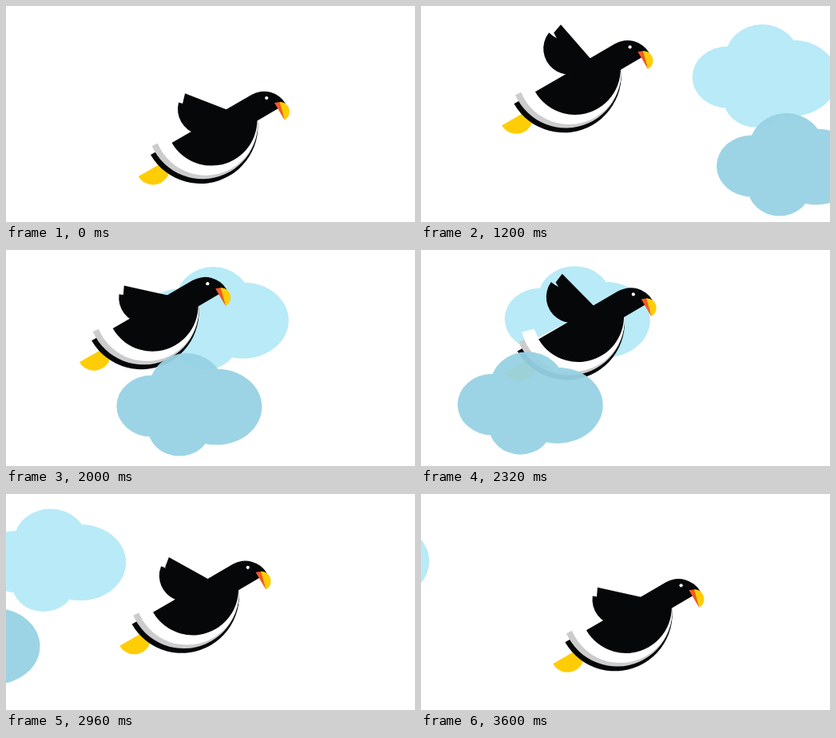
These frames come from a looping animation (512 px wide and 270 px high, 3680 ms). An HTML page with a canvas:

```html
<!DOCTYPE html>
<html lang="en">
<head>
<meta charset="utf-8">
<title>Bird in flight</title>
<style>
html, body { margin: 0; width: 100%; height: 100%; overflow: hidden; background: #fff; }
canvas { display: block; width: 512px; height: 270px; }
</style>
</head>
<body>
<canvas id="stage" width="512" height="270"></canvas>
<script>
const ctx = document.getElementById('stage').getContext('2d');
const LOOP = 3680, STEP = 80, FLAP = 1600 / 3;
const BLACK = '#050709', YELLOW = '#ffcd05';
const PIVOT = [277, 129.7], REST_ANGLE = 20.4;
const rad = deg => deg * Math.PI / 180;
const ease = p => (1 - Math.cos(Math.PI * p)) / 2;

// Wing angle: a quick upstroke followed by a slower downstroke.
function wingAngle(t) {
  const low = 4, high = 51, upstroke = .425;
  const phase = (t / FLAP + .15) % 1;
  const lift = phase < upstroke ? phase / upstroke : (1 - phase) / (1 - upstroke);
  return low + (high - low) * lift;
}

function shape(color, trace) {
  ctx.fillStyle = color;
  ctx.beginPath();
  trace();
  ctx.closePath();
  ctx.fill();
}

const poly = points => points.forEach(([x, y]) => ctx.lineTo(x, y));

function cloud(x, y, color) {
  const lobe = (cx, cy, rx, ry) => {
    ctx.moveTo(x + cx + rx, y + cy);
    ctx.ellipse(x + cx, y + cy, rx, ry, 0, 0, 2 * Math.PI);
  };
  shape(color, () => {
    lobe(44, 66, 44, 38.5);
    lobe(87.5, 41.5, 46, 41.5);
    lobe(125, 67, 57, 47.5);
    lobe(78.7, 92, 40, 36.5);
  });
}

// Lower half of a disc whose flat side starts at the given angle.
const bowlArc = (x, y, r, start = 150) => ctx.arc(x, y, r, rad(start), rad(start - 180), true);
const bowl = (color, x, y, r) => shape(color, () => bowlArc(x, y, r));

function swing(angle, drawPart) {
  ctx.save();
  ctx.translate(...PIVOT);
  ctx.rotate(rad(angle));
  ctx.translate(-PIVOT[0], -PIVOT[1]);
  drawPart();
  ctx.restore();
}

// The rounded rear of the wing follows the front feather a little less far.
function wing(angle) {
  const turn = angle - REST_ANGLE;
  swing(turn * .85, () => shape(BLACK, () => {
    poly([PIVOT, [222, 122.3], [216, 120.7]]);
    ctx.arc(247, 129, 32, rad(194.5), rad(60), true);
  }));
  swing(turn, () => shape(BLACK, () => poly([PIVOT, [224, 109.5], [221, 122.5], [247, 140]])));
}

function bird(dx, dy, angle) {
  ctx.save();
  ctx.translate(dx, dy);
  bowl(YELLOW, 184, 202.5, 21);
  bowl(BLACK, 243.4, 150, 72);
  // Nested feather bands
  shape('#cccccc', () => {
    bowlArc(246, 147, 69.2, 156.2);
    poly([[258, 160], [190, 171.5]]);
  });
  shape('#fff', () => {
    bowlArc(250, 146.5, 65.2, 166.2);
    poly([[258, 142], [207, 169], [202, 158]]);
  });
  wing(angle);
  bowl(BLACK, 257.2, 142.3, 57.3);
  // Neck and head
  shape(BLACK, () => {
    poly([[258, 139.6], [307.3, 110.9]]);
    ctx.arc(323, 138.2, 31.5, rad(-120), rad(-30));
    poly([[314, 143.7], [258, 160]]);
  });
  // Beak
  shape('#f15a22', () => poly([[336, 121], [344, 119.8], [349, 143]]));
  shape(YELLOW, () => ctx.arc(343, 132, 12, rad(-92), rad(60)));
  // Eye
  shape('#fff', () => ctx.arc(326.2, 115, 2.1, 0, 2 * Math.PI));
  ctx.restore();
}

function draw(t) {
  ctx.fillStyle = '#fff';
  ctx.fillRect(0, 0, 512, 270);

  const sway = 3.3 * Math.sin(2 * Math.PI * t / LOOP);
  cloud(600 - .2145 * t - sway, 26 - .0025 * t, '#b8eaf7');

  const climb = ease(Math.min(t / 1680, (3720 - t) / 2080));
  bird(-79.6 * climb, -78.5 * climb, wingAngle(t));

  cloud(717.4 - .2895 * t, 141.3 - .0061 * t, 'rgba(151, 210, 228, .95)');
}

const begin = performance.now();
function tick() {
  const t = (performance.now() - begin) % LOOP;
  draw(Math.floor(t / STEP) * STEP);
  requestAnimationFrame(tick);
}
tick();
</script>
</body>
</html>
```
